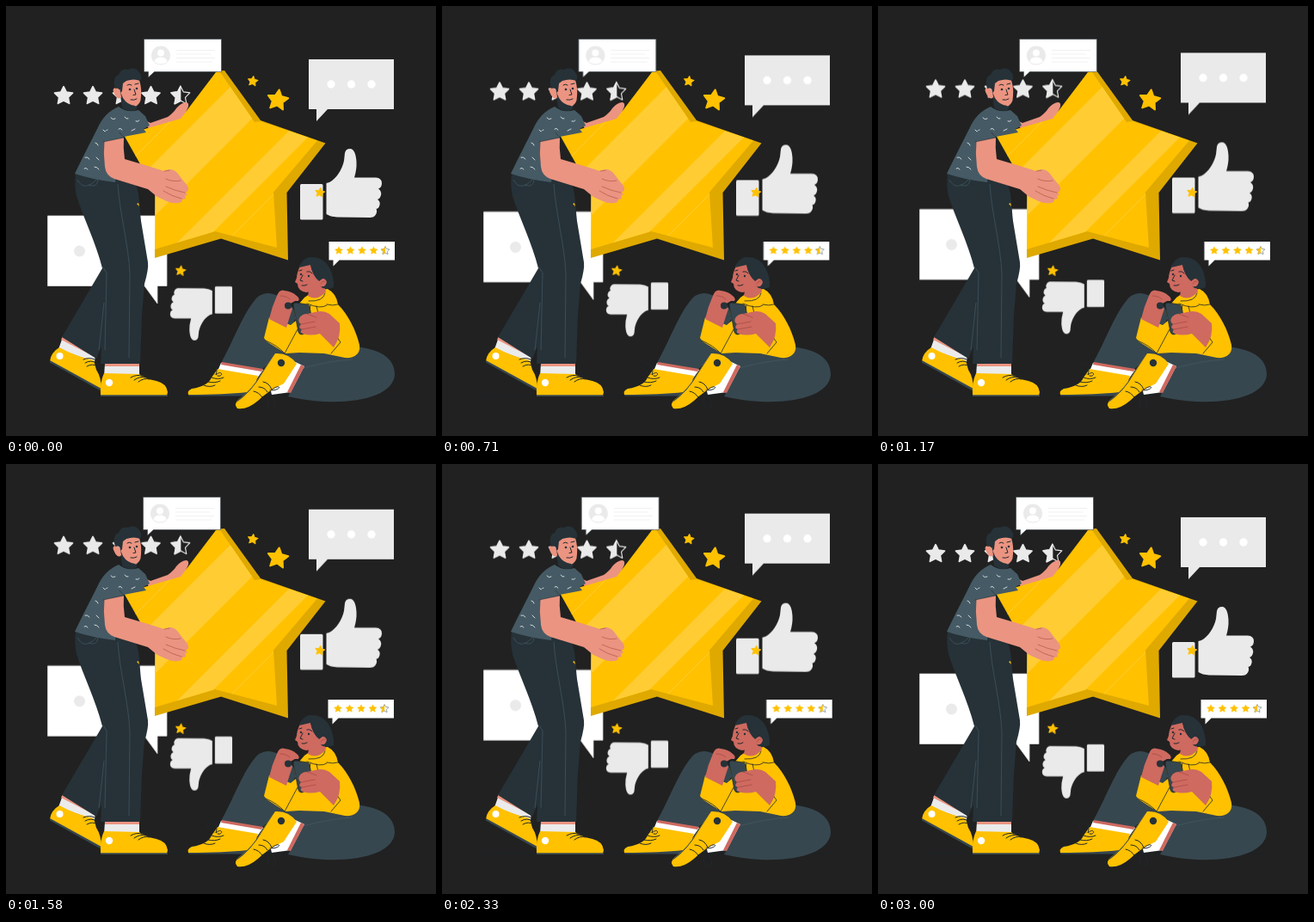
Write an HTML page without scripts that moves like this. It is 500x500 px and loops after 3040 ms.

```html
<!DOCTYPE html>
<html lang="en">
<head>
<meta charset="utf-8">
<title>Customer rating</title>
<style>
html, body { margin: 0; width: 100%; height: 100%; overflow: hidden; background: #212121; }
svg { display: block; width: 100%; height: 100%; }
.float { animation: float 3.04s linear infinite; }
.shake { animation: shake 3.04s ease infinite; }
@keyframes float {
  0%, 99%, 100% { transform: translateY(0); }
  49.5% { transform: translateY(-9.7px); }
}
@keyframes shake {
  0%, 99.3%, 100% { transform: translateX(0); }
  9.9%, 89.4% { transform: translateX(-1px); }
  19.9%, 79.5% { transform: translateX(2px); }
  29.8%, 49.7%, 69.5% { transform: translateX(-4px); }
  39.7%, 59.6% { transform: translateX(4px); }
}
.gray { fill: #eaeaea; }
.white { fill: #fff; }
.gold { fill: #ffc100; }
.navy { fill: #263238; }
.slate { fill: #37474f; }
.skin { fill: #eb9481; }
.tan { fill: #ce6a60; }
.ink { fill: none; stroke: #20282d; stroke-width: 1; stroke-linecap: round; stroke-linejoin: round; }
.seam { fill: none; stroke: #455a64; stroke-width: .7; }
.fold { fill: none; stroke: #a94c46; stroke-width: .8; stroke-linecap: round; }
</style>
</head>
<body>
<svg viewBox="0 0 500 500">
<defs>
  <path id="star" d="M0-10 3-4.1 9.7-3.2 4.9 1.6 6.100 8.2 0 5-6.100 8.2-4.9 1.6-9.7-3.2-3-4.1Z" stroke-linejoin="round"/>
  <clipPath id="half"><path d="M-12-12H.3V12H-12Z"/></clipPath>
  <g id="halfStar">
    <use href="#star" fill="none" stroke-width="1"/>
    <use href="#star" clip-path="url(#half)" stroke-width="1.6"/>
  </g>
  <g id="thumb" class="gray">
    <path d="M343.500 207H367Q368.500 207 368.500 208.500V247Q368.500 248.500 367 248.500H343.500Q342 248.500 342 247V208.500Q342 207 343.500 207Z"/>
    <path d="M372.500 206 376 205C384 201 391 190 393 180L394 171Q395 166 400 166C405 166 407 173 407.500 181Q408 190 405 199.500H430Q437 200 437 206 437 211 433 212.500 437 215 436 220 435 224 432 225 435.500 227 434.500 231.500 433.500 235.500 430.500 236 432 239 430 242.500 428 246 423 246L385 245.500Q377 245 372.500 242Z"/>
  </g>
  <path id="front" d="M244 77 248 75.500 289 135 296 134 362 156.500 311 216.500 315 281 243 262 173 283 173.500 215 137 150 203 131Z"/>
  <clipPath id="face"><use href="#front"/></clipPath>
</defs>

<path d="M48 452.700H452" stroke="#1b2226"/>

<g class="float">
  <g class="gray" stroke="#eaeaea" stroke-width="1.600">
    <use href="#star" transform="translate(67 104.500) scale(1.080)"/>
    <use href="#star" transform="translate(101 104.500) scale(1.080)"/>
    <use href="#star" transform="translate(135 104.500) scale(1.080)"/>
    <use href="#star" transform="translate(168.500 104.500) scale(1.080)"/>
    <use href="#halfStar" transform="translate(203 104.500) scale(1.120)"/>
  </g>
  <path class="gray" d="M352 62H451V120H374L361 134V120H352Z"/>
  <g class="white"><circle cx="378" cy="91" r="4.700"/><circle cx="401.500" cy="91" r="4.700"/><circle cx="425" cy="91" r="4.700"/></g>
  <use href="#thumb"/>
  <use href="#thumb" transform="translate(523 515) scale(-.76)"/>
  <path class="white" stroke="#dedede" stroke-width=".8" d="M48.500 244H187V325.500H176V346L161 325.500H48.500Z"/>
  <circle class="gray" cx="85.500" cy="285" r="6.500"/>
</g>

<g class="gold" stroke="#ffc100" stroke-width="1.600">
  <use href="#star" transform="translate(287 87.500) rotate(8) scale(.6)"/>
  <use href="#star" transform="translate(316 109.500) rotate(8) scale(1.220)"/>
  <use href="#star" transform="translate(203 308) rotate(8) scale(.6)"/>
  <use href="#star" transform="translate(365 217) rotate(8) scale(.57)"/>
</g>

<!-- big star -->
<path class="skin" d="M158 131Q164 134 168 136L188 129Q195 124 198 119 203 113 209 112 213 112 212 117L204 135 170 148Z"/>
<path fill="#dfa900" d="M244 77 248 75.500 254 75 296 133 371.500 159.500 326.500 217 328 295.500 250 270.500 173 293 173 283Z"/>
<use href="#front" class="gold"/>
<g clip-path="url(#face)" stroke="#ffcd33">
  <path d="M336 50 136 250" stroke-width="44"/>
  <path d="M389 100 189 300" stroke-width="21"/>
  <path d="M225 100 150 175M320 210 260 270" stroke-width="1"/>
</g>

<!-- review cards -->
<g class="shake">
  <path class="white" stroke="#263238" stroke-width=".5" d="M160.500 38.500H250.500V76.500H172.500L165.500 83V76.500H160.500Z"/>
  <circle class="gray" cx="180" cy="57.500" r="11"/>
  <circle class="white" cx="180" cy="54.500" r="4"/>
  <path class="white" d="M172.500 65Q173 59.500 180 59.500T187.500 65Q180 70 172.500 65Z"/>
  <path d="M198 51.500H243M198 56H238M198 60.500H243M198 65H240" stroke="#f0f0f0" stroke-width=".9"/>
  <path class="white" d="M375.500 274H452V295.500H387.500L380.500 302.500V295.500H375.500Z"/>
  <g class="gold" stroke="#ffc100" stroke-width="1">
    <use href="#star" transform="translate(387 284.500) scale(.46)"/>
    <use href="#star" transform="translate(400.500 284.500) scale(.46)"/>
    <use href="#star" transform="translate(414 284.500) scale(.46)"/>
    <use href="#star" transform="translate(427.500 284.500) scale(.46)"/>
    <use href="#star" transform="translate(441 284.500) scale(.5)" fill="none" stroke="#37474f"/>
    <use href="#star" transform="translate(441 284.500) scale(.46)" clip-path="url(#half)"/>
  </g>
</g>

<!-- man -->
<g>
  <!-- shoes and socks -->
  <path fill="#ebebeb" d="M66 385 104 404 103 414 61 399Z"/>
  <path class="skin" d="M66 384 104 404 103 408 64 388Z"/>
  <path class="gold" d="M62 397Q80 407 102 412L105 423Q111 432 111 446L51 413Q52 403 62 397Z"/>
  <path class="slate" d="M51 412 111 445V448L51 414.500Z"/>
  <circle class="white" cx="62.500" cy="407" r="4"/>
  <path class="ink" d="M90 411Q97 408 103 411M92 415Q99 411 105 415M94 419Q101 415 106 419"/>
  <path fill="#ebebeb" d="M115 416H155V430H114Z"/>
  <path class="skin" d="M115 415H155V419H115Z"/>
  <path class="gold" d="M114 427 155 428Q161 433 175 436 187 439 188 449L187 453H110Q109 437 114 427Z"/>
  <path class="slate" d="M110 452.300H188V454H110Z"/>
  <circle class="white" cx="120" cy="438" r="4.200"/>
  <path class="ink" d="M145 432Q152 428 158 430M149 435Q156 430 162 432M154 437Q160 432 167 434M158 430Q165 427 167 431"/>
  <!-- trousers -->
  <path class="navy" d="M81 195 130 201 151 207C156 222 155 232 157 250L165 298Q166 306 161 323L158 360 156 416H110L111 396 105 410 65 385 112 305C105 276 89 244 82 221Q79 207 81 195Z"/>
  <path class="seam" d="M83 202Q91 217 106 201M130 207C132 240 143 280 144 312L143 409M112 303 117 310 115 400M108 400 114 345M96 208Q106 212 107 202"/>
  <path d="M152 230 154 229 155 233Z" class="gold"/>
  <!-- shirt -->
  <path fill="#455a64" d="M131 117Q141 125 154 121L162 128 167 139 160 143 163 147 137 152 132 160 127 205Q101 202 80 195C88 178 99 157 106 143Q114 124 131 117Z"/>
  <g fill="none" stroke="#e3e7e9" stroke-width=".9" stroke-linecap="round">
    <path d="M122 130q2 3 5 1M138 129q2 3 4 2M113 144l2 2 3-2M131 143q2-2 4 1M104 159q2 0 3 3M92 176q3-1 5 2M105 176l3 3M91 189q2-2 4 1M103 187q3 0 5 3M151 134q3 1 4-1M146 145l4-2"/>
  </g>
  <!-- near arm -->
  <path class="skin" d="M114.500 157 137 153Q136 165 138 178L165 186 184 192Q193 187 200 195L206 203Q213 210 212 214L209 217 211 219 208 221 209 224 205 225 204 228Q196 231 187 227L176 222 165 213 126 201Q116 197 115 187 113 172 114.500 157Z"/>
  <path fill="none" stroke="#b95f50" stroke-width=".8" stroke-linecap="round" d="M186 201Q194 205 203 203M186 210Q197 215 208 217M183 215Q192 221 204 224M184 192 190 191"/>
  <path fill="#455a64" d="M113 158 137 153V149L116 145Z"/>
  <path class="ink" stroke-opacity=".5" d="M113 158 137 153 132 147"/>
  <!-- head -->
  <path class="navy" d="M133 104 135 118Q143 124 151 121L154 114Z"/>
  <path class="skin" d="M134 86Q145 80 155 86 158 96 157 105 157 115 149 117 139 115 134 106 131 110 127 104 122 96 127 95 131 95 133 99Z"/>
  <path class="navy" d="M127 96Q123 83 131 80 134 72 142 74 150 70 155 77 159 82 156 87 149 84 140 87L136 90 135 99 133 101Q133 94 127 96Z"/>
  <path class="navy" d="M133 100 136 107Q141 115 150 116L151 120Q142 123 136 116Z"/>
  <g class="navy"><circle cx="144" cy="97" r="1.300"/><circle cx="152" cy="96" r="1.300"/></g>
  <path class="ink" d="M141 92Q143 90 146 92M150 91 154 90M149 97 151 103 148 103.500M145 109Q149 110 152 108"/>
</g>

<!-- woman -->
<g>
  <!-- far leg -->
  <path class="slate" d="M250 415C264 390 274 362 287 345Q296 331 311 335 330 341 338 359L321 402 296 424Z"/>
  <path class="white" d="M250 415 299 423 292 433 245 427Z"/>
  <path class="tan" d="M251 414 299 422 297 425 250 417Z"/>
  <path class="gold" d="M246 422 293 430 288 446Q275 453 254 453H213Q209 448 216 445 235 442 239 432Z"/>
  <path class="slate" d="M212 452Q254 452 281 449L279 453.500H213Z"/>
  <path class="ink" d="M239 432Q247 435 253 432M235 437Q243 439 249 436M230 441Q237 444 243 441M242 428C232 423 231 414 238 416 245 417 246 423 244 429 252 422 253 432 246 430"/>
  <!-- near leg -->
  <path class="slate" d="M322 401Q355 395 385 396C416 394 453 401 452 429 450 451 415 462 370 460Q349 459 328 454L347 420 316 405Z"/>
  <path class="seam" d="M345 421Q380 412 403 411"/>
  <path class="white" d="M318 405 347 419 331 449 309 452 302 423Z"/>
  <path class="tan" d="M343 417 347 419 331 450 327 449Z"/>
  <path class="gold" d="M313 404Q329 403 338 416L323 439Q304 448 293 459 280 470 269 468 264 463 271 457 287 445 297 427Z"/>
  <path class="slate" d="M313 404 297 427Q287 445 271 457L268 461Q287 447 298 427Z"/>
  <circle class="navy" cx="320" cy="415" r="4.200"/>
  <path class="ink" d="M299 437Q306 438 309 446M294 443Q301 443 304 449M288 448Q294 449 298 455M309 446C320 438 322 447 307 447M306 449C302 462 306 471 312 467 317 461 310 455 306 449"/>
  <!-- body -->
  <path class="gold" d="M347 339Q358 330 374 329 384 334 386 347C398 359 407 377 411 394 413 405 404 410 394 409L370 404 341 403 325 404 303 390 300 386 306 362 331 371 337 366 335 353Z"/>
  <path class="ink" stroke-width=".8" d="M302 389Q316 395 324 404L339 376M382 381 389 391 378 404M371 334Q369 344 352 343M373 348Q366 353 350 346M386 347Q380 349 373 347M354 348 352 358M361 349 363 357" stroke-opacity=".8"/>
  <!-- hands and phone -->
  <path class="tan" d="M306 364Q309 350 315 337 318 329 324 331 333 332 338 337 342 340 340 343L336 343 329 347 333 352 330 361 326 374Z"/>
  <path class="fold" d="M319 337Q326 337 330 341M329 347 324 347"/>
  <circle class="navy" cx="328" cy="348.500" r="4"/>
  <path fill="#37474f" stroke="#20282d" stroke-width=".8" d="M337 345 350 347Q352 347 353 350L358 376 344 382Q341 382 340 379L334 348Q334 345 337 345Z"/>
  <path class="tan" d="M341 363Q344 358 350 358L359 356Q369 353 376 358L388 369Q390 384 381 397L365 381Q354 384 345 381 341 379 344 376 339 374 343 370 339 367 341 363Z"/>
  <path class="fold" d="M343 370 359 367M344 376 360 373M350 358 361 362"/>
  <!-- head -->
  <path class="tan" d="M354 321 369 320 372 332Q362 344 351 337Z"/>
  <path class="navy" d="M341 303Q345 293 356 292 369 292 376 304 382 316 381 327 376 330 368 328L352 311Z"/>
  <path class="tan" d="M342 302Q338 311 338 316L336 321 339 323Q339 331 349 333 358 332 364 325 371 329 373 321 371 315 365 318L362 318Q356 310 354 300Z"/>
  <path class="navy" d="M341 304Q344 294 353 292L369 296Q374 306 368 317L364 320Q356 313 354 301Z"/>
  <g class="navy"><circle cx="343" cy="312" r="1.200"/><circle cx="352" cy="314" r="1.200"/></g>
  <path class="ink" stroke-width=".9" d="M341 308 344 307M350 309Q354 308 356 311M345 313 342 319 345 320M344 325Q347 326 350 324"/>
  <path class="fold" d="M366 323Q368 319 371 320"/>
</g>
</svg>
</body>
</html>
```
